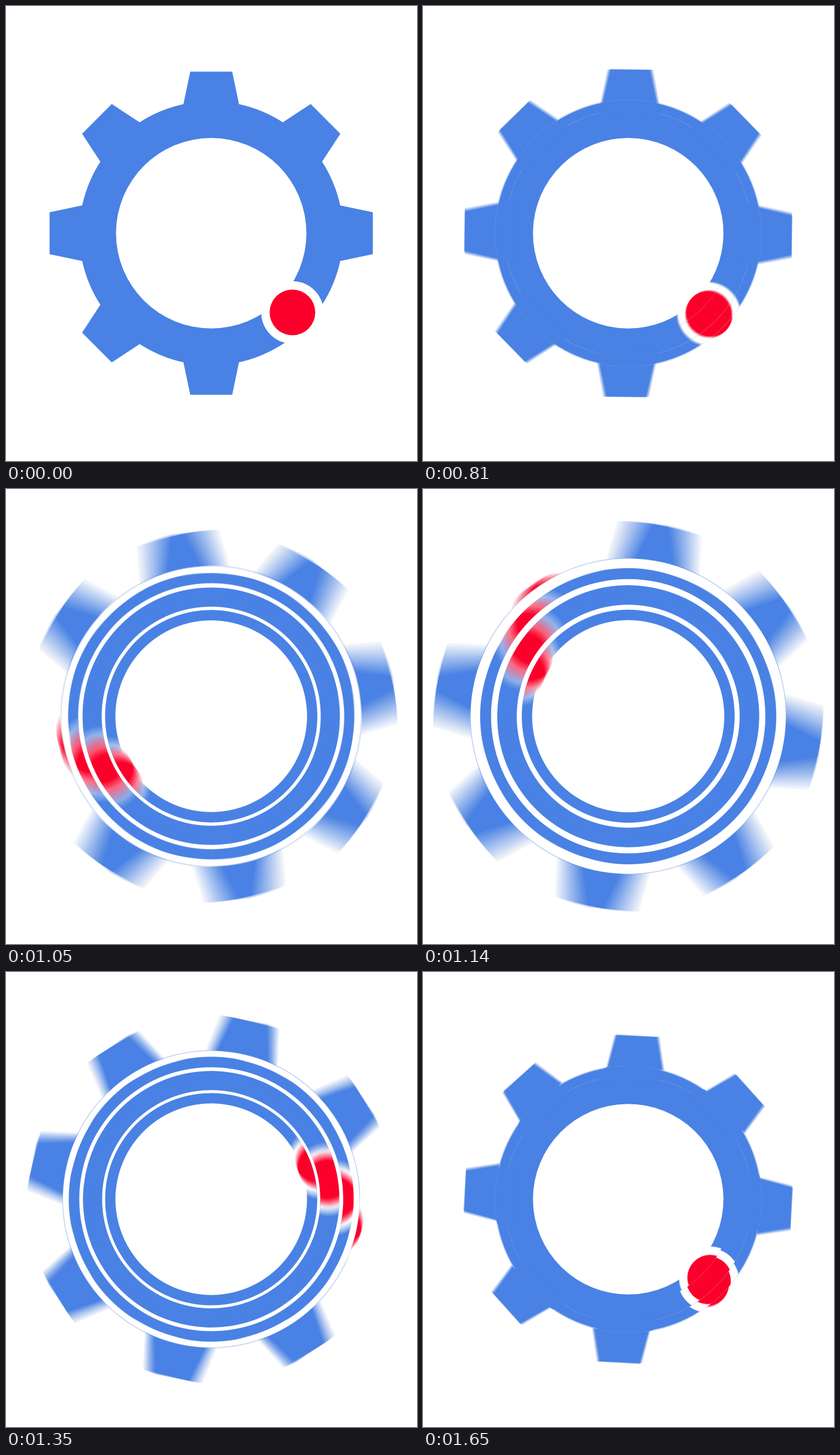
Recreate the animation shown at these times as an HTML page with a canvas. Size 711x787 px, loop 1.68 s.

```html
<!DOCTYPE html>
<html lang="en">
<head>
<meta charset="utf-8">
<title>Gear spin</title>
<style>
html, body { margin: 0; width: 100%; height: 100%; overflow: hidden; background: #fff; }
canvas { display: block; }
</style>
</head>
<body>
<canvas id="stage" width="711" height="787"></canvas>
<script>
const W = 711, H = 787, CX = 355, CY = 393;
const LOOP = 1680, STEP = 30, START = 630, PEAK = 1130;
const SHUTTER = 16, SAMPLES = 16;
const BLUE = '#4982e4', RED = '#fb002a', WHITE = '#fff';

// Wind up, one fast turn, settle: [ms, degrees]
const TURN = [[600, 0], [720, -6], [930, 24], [1050, 102.5], [1230, 218.5], [1350, 296], [LOOP, 360]];

// Concentric layers: inner cut, outer cut, share of the spread and the lead
const LAYERS = [[227.9, 300, 1], [212.3, 229, .6], [181.4, 213, .32], [0, 182.4, .05]];

const out = document.getElementById('stage').getContext('2d');
const buffer = document.createElement('canvas');
buffer.width = W;
buffer.height = H;
const pen = buffer.getContext('2d');

const progress = (t, from, to) => Math.min(1, Math.max(0, (t - from) / (to - from)));

// Smooth curve through the key points, at rest at both ends
function along(keys, t) {
  const slope = i => i > 0 && i < keys.length - 1
    ? (keys[i + 1][1] - keys[i - 1][1]) / (keys[i + 1][0] - keys[i - 1][0]) : 0;
  let i = 1;
  while (i < keys.length - 1 && keys[i][0] <= t) i++;
  const [t0, a] = keys[i - 1], [t1, b] = keys[i];
  const d = t1 - t0, x = progress(t, t0, t1), y = 1 - x;
  return a + (b - a) * x * x * (3 - 2 * x) + d * x * y * (slope(i - 1) * y - slope(i) * x);
}

const turn = t => along(TURN, t);

// How far the outermost layer runs ahead, in degrees
const lead = t => 33 * Math.sin(Math.PI * progress(t, 860, LOOP));

// How much the outermost layer grows
const spread = t => .2 * (t < PEAK
  ? progress(t, 750, PEAK) ** 1.5
  : 1 - progress(t, PEAK, LOOP) ** 1.1);

function disc(x, y, r, color) {
  pen.fillStyle = color;
  pen.beginPath();
  pen.arc(x, y, r, 0, 2 * Math.PI);
  pen.fill();
}

function drawGear() {
  disc(0, 0, 228.3, BLUE);
  for (let i = 0; i < 8; i++) {
    if (i === 3) continue; // the dot sits here
    pen.save();
    pen.rotate(i * Math.PI / 4);
    pen.beginPath();
    pen.moveTo(-52.9, -200);
    pen.lineTo(-36.3, -279.6);
    pen.lineTo(36.3, -279.6);
    pen.lineTo(52.9, -200);
    pen.fill();
    pen.restore();
  }
  disc(0, 0, 164.7, WHITE);
  disc(140.5, 137, 54, WHITE);
  disc(140.5, 137, 39.5, RED);
}

function drawLayer(angle, scale, inner, outer) {
  pen.save();
  pen.translate(CX, CY);
  pen.rotate(angle * Math.PI / 180);
  pen.scale(scale, scale);
  if (outer) {
    pen.beginPath();
    pen.arc(0, 0, outer, 0, 2 * Math.PI);
    pen.moveTo(inner, 0);
    pen.arc(0, 0, inner, 0, 2 * Math.PI, true);
    pen.clip();
  }
  drawGear();
  pen.restore();
}

function drawPose(t) {
  const angle = turn(t), ahead = lead(t), grow = spread(t);
  pen.fillStyle = WHITE;
  pen.fillRect(0, 0, W, H);
  if (grow === 0) {
    drawLayer(angle, 1);
    return;
  }
  for (const [inner, outer, share] of LAYERS) {
    drawLayer(angle + ahead * share, 1 + grow * share, inner, outer);
  }
}

// Motion blur: running average of poses across the shutter time
function render(t) {
  const n = t < START ? 1 : SAMPLES;
  for (let i = 0; i < n; i++) {
    drawPose(t + ((i + .5) / n - .5) * SHUTTER);
    out.globalAlpha = 1 / (i + 1);
    out.drawImage(buffer, 0, 0);
  }
  out.globalAlpha = 1;
}

let shown = -1;
function tick(now) {
  const step = Math.floor((now % LOOP) / STEP) * STEP;
  const t = step < START ? 0 : step;
  if (t !== shown) render(shown = t);
  requestAnimationFrame(tick);
}
tick(performance.now());
</script>
</body>
</html>
```
